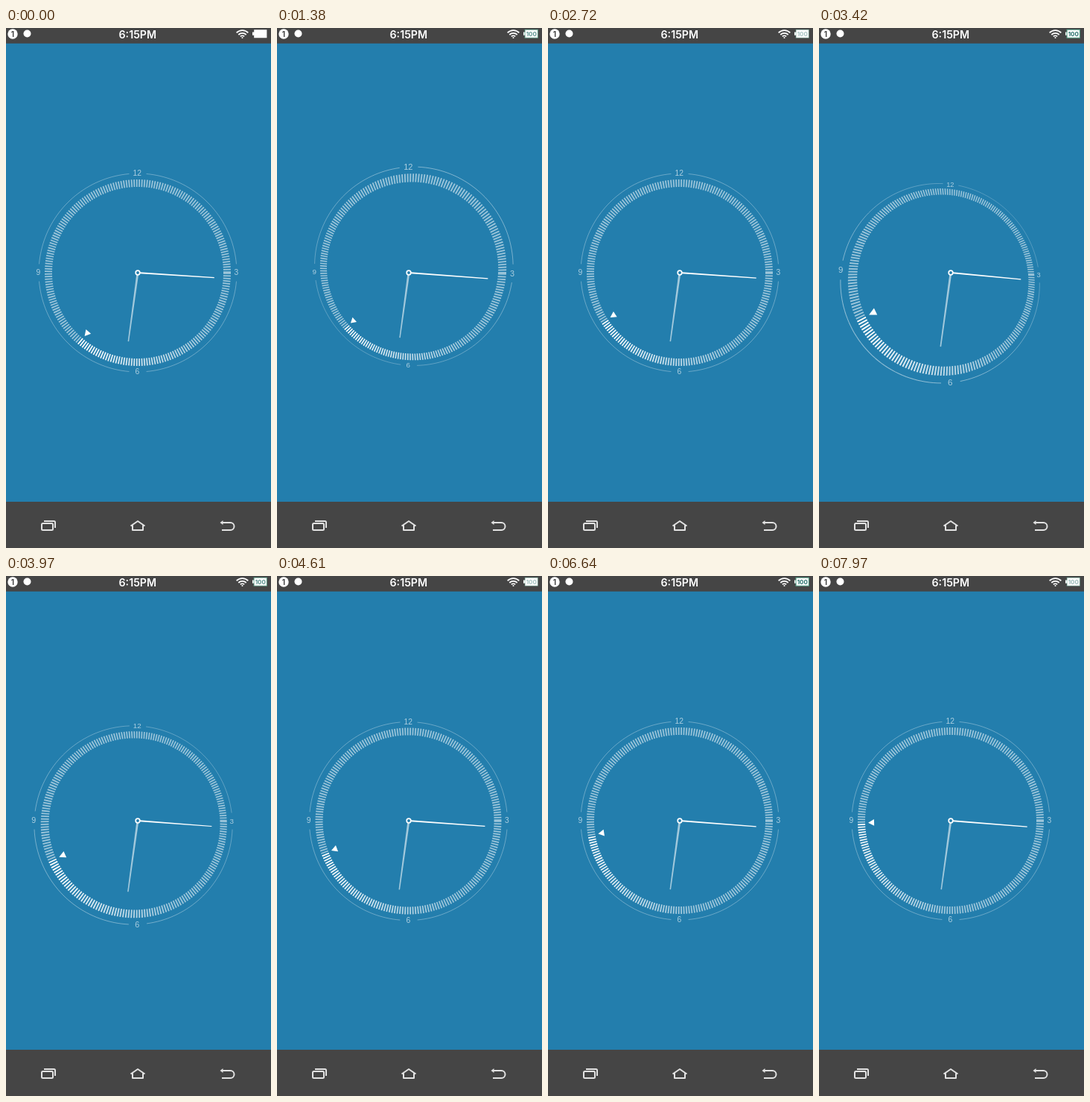
An HTML page with a canvas for the animation above (8120 ms loop, 356 by 697 pixels).

```html
<!DOCTYPE html>
<html lang="en">
<head>
<meta charset="utf-8">
<title>Tilting clock</title>
<style>
  html, body { margin: 0; width: 100%; height: 100%; overflow: hidden; background: #237ead; }
  svg, canvas { position: absolute; left: 0; top: 0; width: 356px; height: 697px; display: block; }
  .time { font: 600 14.2px Inter, Roboto, sans-serif; fill: #fff; text-anchor: middle; }
  .badge { font: 700 10px Inter, Roboto, sans-serif; fill: #444; text-anchor: middle; }
  .level { font: 700 8px Inter, Roboto, sans-serif; fill: #27716c; text-anchor: middle; }
  .nav, .wifi { fill: none; stroke: #e2e2e2; stroke-width: 2; stroke-linejoin: round; }
  .wifi { stroke: #fff; stroke-width: 1.8; }
</style>
</head>
<body>
<canvas id="dial"></canvas>
<svg viewBox="0 0 356 697">
  <rect width="356" height="20.7" fill="#454545"/>
  <rect y="635" width="356" height="62" fill="#454545"/>

  <circle cx="9" cy="8" r="6.7" fill="#fff"/>
  <text class="badge" x="8.8" y="11.6">1</text>
  <circle cx="28.5" cy="7.5" r="5" fill="#fff"/>
  <text class="time" x="176.8" y="13.8">6:15PM</text>

  <g class="wifi">
    <path d="M309.7 6.3a11 11 0 0 1 15.6 0"/>
    <path d="M312.3 9a7.3 7.3 0 0 1 10.4 0"/>
    <path d="M314.9 11.4a3.7 3.7 0 0 1 5.2 0"/>
    <circle cx="317.5" cy="13" r="1" fill="#fff" stroke="none"/>
  </g>
  <path d="M331 5.500h2.200v-3.300h17.200v11h-17.200v-3.500h-2.200z" fill="#fff"/>
  <g id="level">
    <rect x="333" y="2.2" width="17.4" height="11" fill="none" stroke="#4c9a80"/>
    <text class="level" x="341.8" y="10.7">100</text>
  </g>

  <g class="nav">
    <rect x="48" y="664" width="15" height="9" rx="1.5"/>
    <path d="M51 661h13.500q1.500 0 1.500 1.500v7.500"/>
    <path d="M167.500 667.500l9.500-6.500 9.500 6.500M170 666.500v6.500h14v-6.500"/>
    <path d="M289 663h12.500a5 5 0 0 1 0 10h-11.500"/>
    <path d="M291.500 660v6l-4-3z" fill="#e2e2e2" stroke="none"/>
  </g>
</svg>
<script>
const LOOP = 8.12, CX = 177, CY = 328, DEPTH = 190, RAD = Math.PI / 180;
// The dashes do not divide the ring evenly: two of them meet at 3 o'clock
const DASH = 360 / 219.5;
const canvas = document.getElementById('dial');
const level = document.getElementById('level');
const dpr = window.devicePixelRatio || 1;
canvas.width = 356 * dpr;
canvas.height = 697 * dpr;
const ctx = canvas.getContext('2d');
ctx.scale(dpr, dpr);

let sinA, cosA, sinB, cosB;

// Eased value between [time, value] keys
function curve(keys, t) {
  if (t <= keys[0][0]) return keys[0][1];
  for (let i = 1; i < keys.length; i++) {
    const [t1, v1] = keys[i], [t0, v0] = keys[i - 1];
    if (t <= t1) return v0 + (v1 - v0) * (0.5 - 0.5 * Math.cos(Math.PI * (t - t0) / (t1 - t0)));
  }
  return keys[keys.length - 1][1];
}

// Damped swing after the finger lifts; settles in one second
const spring = u => u < 1 ? 2 ** (-2 * u) * Math.cos(2 * Math.PI * u / 0.5714) : 0;

function tilt(t) {
  if (t < 1.6) return curve([[1.15, 0], [1.5, -7.3]], t);
  if (t < 2.7) return -7.3 * spring(t - 1.6);
  if (t < 3.45) return curve([[2.7, 0], [3.27, 4.9], [3.42, 8.9]], t);
  if (t < 4.45) return 8.9 * spring(t - 3.45);
  return curve([[4.45, 0], [5.39, 4.9], [5.65, -3], [5.9, 0.3], [6.15, 0]], t);
}

const levelKeys = [[0, 0], [1.1, 0.9], [2.1, 0.04], [2.3, 0.05], [3.3, 1], [3.55, 1], [4.55, 0.4],
  [5.25, 1], [5.5, 1], [6, 0.4], [6.55, 1], [6.8, 1], [7.9, 0.5], [8.12, 0.3]];

// Dial plane to stage: turn about Y, then X, then perspective
function project(x, y) {
  const z1 = -x * sinB;
  const z = y * sinA + z1 * cosA;
  const s = DEPTH / (DEPTH - z);
  return [CX + x * cosB * s, CY + (y * cosA - z1 * sinA) * s, s];
}

// Angle in degrees clockwise from 12; side is the offset across the ray
function polar(deg, r, side = 0) {
  const s = Math.sin(deg * RAD), c = Math.cos(deg * RAD);
  return project(s * r + c * side, -c * r + s * side);
}

const white = a => `rgba(255,255,255,${a})`;

function shape(points, color) {
  ctx.fillStyle = color;
  ctx.beginPath();
  for (const [x, y] of points) ctx.lineTo(x, y);
  ctx.fill();
}

function bar(deg, r0, r1, w0, w1, color) {
  shape([polar(deg, r0, -w0 / 2), polar(deg, r1, -w1 / 2),
    polar(deg, r1, w1 / 2), polar(deg, r0, w0 / 2)], color);
}

function drawRim() {
  ctx.strokeStyle = white(0.5);
  for (let q = 0; q < 360; q += 90) {
    let last = polar(q + 5, 133);
    for (let d = 7; d <= 85; d += 2) {
      const p = polar(q + d, 133);
      ctx.lineWidth = 0.65 * p[2] ** 3;
      ctx.beginPath();
      ctx.moveTo(last[0], last[1]);
      ctx.lineTo(p[0], p[1]);
      ctx.stroke();
      last = p;
    }
  }
  ctx.fillStyle = white(0.62);
  ctx.textAlign = 'center';
  ['12', '3', '6', '9'].forEach((label, i) => {
    const [x, y, s] = polar(i * 90, 133);
    const size = 10.3 * s;
    ctx.font = `${size}px "Liberation Sans", Arial, sans-serif`;
    ctx.fillText(label, x - 0.7, y + size * 0.33);
  });
}

function drawTicks(sec) {
  for (let a = DASH / 4; a < 360; a += DASH) {
    const deg = (90 + a) % 360;
    const behind = (sec - deg + 360) % 360;
    bar(deg, 115, 125, 1.68, 1.76, white(0.55 + 0.45 * Math.max(0, 1 - behind / 90)));
  }
}

function drawHands(sec) {
  const minute = 90 + sec / 60;
  bar(180 + minute / 12, 3, 93, 2.8, 1.5, white(0.58));
  bar(minute, 3, 103, 2.1, 1.2, '#fff');
  ctx.strokeStyle = '#fff';
  ctx.lineWidth = 1.7;
  ctx.beginPath();
  ctx.arc(CX, CY, 2.8, 0, 2 * Math.PI);
  ctx.stroke();
}

function draw(now) {
  const t = now / 1000 % LOOP;
  const a = tilt(t) * RAD;
  const b = a * (t < 2.7 ? 0.78 : 1);
  sinA = Math.sin(a); cosA = Math.cos(a);
  sinB = Math.sin(b); cosB = Math.cos(b);

  const sec = 220 + 6.5 * t - 0.05 * t * t;
  ctx.clearRect(0, 0, 356, 697);
  drawRim();
  drawTicks(sec);
  shape([polar(sec, 111), polar(sec, 103, -4.4), polar(sec, 103, 4.4)], '#fff');
  drawHands(sec);
  level.setAttribute('opacity', curve(levelKeys, t).toFixed(3));
}

function frame(now) {
  draw(now);
  requestAnimationFrame(frame);
}
draw(0);
requestAnimationFrame(frame);
</script>
</body>
</html>
```
